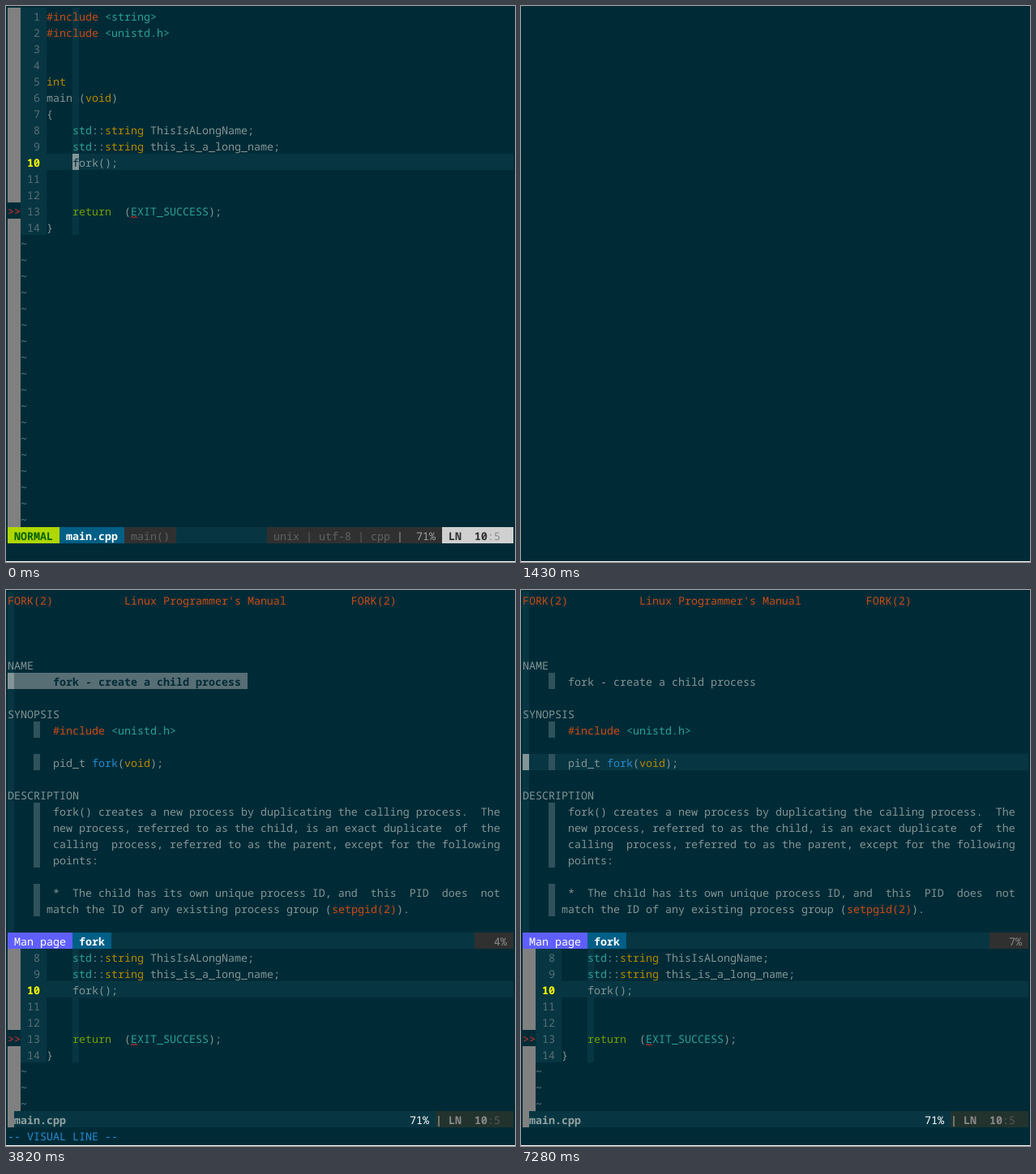
Animation of 628x685 px, one loop 8 s. Source, as an HTML page:

```html
<!DOCTYPE html>
<html lang="en">
<head>
<meta charset="utf-8">
<title>Editor session</title>
<style>
  html, body { margin: 0; width: 100%; height: 100%; overflow: hidden; background: #002b36; }
  svg { display: block; }
  text { font: 13.3333px "Noto Sans Mono", "DejaVu Sans Mono", monospace; white-space: pre; text-rendering: geometricPrecision; }
  .bold { font-weight: bold; }
</style>
</head>
<body>
<svg id="screen" width="628" height="685"></svg>
<script>
const LOOP = 8000, COLS = 78;
const BG = '#002b36', LINE = '#073642', GREY = '#808080', CURSOR = '#839496', DARK = '#303030';

// Each run of text starts with one of these keys; runs are split by tabs.
const INK = {
  t: '#839496', o: '#cb4b16', c: '#2aa198', y: '#b58900', g: '#719e07', b: '#268bd2',
  r: '#dc322f', n: '#586e75', z: '#657b83', d: BG, w: '#ffffff', q: '#626262', l: '#9e9e9e'
};

const SOURCE = [
  'o#include \tc<string>', 'o#include \tc<unistd.h>', '', '',
  'yint', 'tmain (\tyvoid\tt)', 't{',
  't    \tcstd\tt::\tystring\tt ThisIsALongName;',
  't    \tcstd\tt::\tystring\tt this_is_a_long_name;',
  't    fork();', '', '',
  't    \tgreturn\tt  (\tcEXIT_SUCCESS\tt);', 't}'
];

// row: [column, runs]
const MANUAL = {
  0: [0, "oFORK(2)           Linux Programmer's Manual          FORK(2)"],
  4: [0, 'tNAME'],
  5: [7, 'tfork - create a child process'],
  7: [0, 'tSYNOPSIS'],
  8: [7, 'o#include \tc<unistd.h>'],
  10: [7, 'tpid_t \tbfork\tt(\tyvoid\tt);'],
  12: [0, 'tDESCRIPTION'],
  13: [7, 'tfork() creates a new process by duplicating the calling process.  The'],
  14: [7, 'tnew process, referred to as the child, is an exact duplicate  of  the'],
  15: [7, 'tcalling  process, referred to as the parent, except for the following'],
  16: [7, 'tpoints:'],
  18: [7, 't*  The child has its own unique process ID, and  this  PID  does  not'],
  19: [6, 'tmatch the ID of any existing process group (\tosetpgid(2)\tt).']
};
const MANUAL_LINES = 145;

const MESSAGES = [
  'Error detected while processing function <SNR>25_AutoUpdate..<SNR>25_StartExpl',
  'orer:', 'line   83:',
  'E33: No previous substitute regular expression',
  'E33: No previous substitute regular expression',
  'Press ENTER or type command to continue'
];
const SCROLLS = [500, 570, 640, 700, 800];

// [cursor leaves its row, cursor arrives one row below]
const MOVES = [
  [2450, 2450], [2700, 2700], [2890, 2890], [3100, 3140], [3290, 3340],
  [6290, 6340], [6560, 6610], [6790, 6830], [7010, 7060], [7230, 7280]
];

const screen = document.getElementById('screen');
let out = '';

const px = col => 2 + col * 8;
const py = row => 2 + row * 20;
const escape = s => s.replace(/&/g, '&amp;').replace(/</g, '&lt;');
const plain = runs => runs.split('\t').map(run => run.slice(1)).join('');

function rect(x, y, w, h, fill) {
  out += `<rect x="${x}" y="${y}" width="${w}" height="${h}" fill="${fill}"/>`;
}

function box(col, row, cols, fill, rows = 1) {
  rect(px(col), py(row), cols * 8, rows * 20, fill);
}

function put(col, row, text, fill, bold) {
  out += `<text x="${px(col)}" y="${py(row) + 16}" fill="${fill}"${bold ? ' class="bold"' : ''}>${escape(text)}</text>`;
}

function write(col, row, runs) {
  for (const run of runs.split('\t')) {
    if (!run) continue;
    put(col, row, run.slice(1), INK[run[0]]);
    col += run.length - 1;
  }
}

function cursor(col, row, char = '') {
  box(col, row, 1, CURSOR);
  put(col, row, char, BG);
}

function editor(top, end, first) {
  box(0, top, 2, GREY, end - top);
  let row = top;
  for (let n = first; n <= SOURCE.length; n++, row++) {
    const current = n === 10;
    box(2, row, 4, LINE);
    box(10, row, 1, LINE);
    if (current) box(6, row, COLS - 6, LINE);
    put(2, row, String(n).padStart(3), current ? '#ffff00' : INK.n, current);
    write(6, row, SOURCE[n - 1]);
    if (n === 13) {
      box(0, row, 2, BG);
      write(0, row, 'r>>');
      out += `<path d="M${px(19)} ${py(row) + 19}l2-2 2 2 2-2 2 2" fill="none" stroke="${INK.r}"/>`;
    }
  }
  for (; row < end; row++) write(2, row, 'z~');
}

function activeStatus(row) {
  box(0, row, COLS, LINE);
  box(0, row, 8, '#afd700');
  put(1, row, 'NORMAL', '#005f00', true);
  box(8, row, 10, '#005f87');
  put(9, row, 'main.cpp', INK.w, true);
  box(18, row, 8, DARK);
  write(19, row, 'qmain()');
  box(40, row, 27, DARK);
  write(41, row, 'qunix | utf-8 | cpp \tl|  71%');
  box(67, row, 11, '#d0d0d0');
  put(68, row, 'LN  10', DARK, true);
  put(74, row, ':5', '#8a8a8a');
}

function idleStatus() {
  box(0, 32, COLS, LINE);
  box(0, 32, 1, GREY);
  put(1, 32, 'main.cpp', '#93a1a1', true);
  write(62, 32, 'w71%');
  box(66, 32, 12, '#22332e');
  put(66, 32, '|', '#bcbcbc');
  put(68, 32, 'LN  10', '#8a8a8a', true);
  put(74, 32, ':5', '#585858');
}

function messages(scroll) {
  for (let i = 0; i <= scroll; i++) {
    const text = MESSAGES[i], row = 33 - scroll + i;
    if (i === 5) {
      put(0, row, text, INK.c, true);
    } else {
      const note = i === 2;
      box(0, row, text.length, note ? LINE : '#d32f2a');
      put(0, row, text, note ? INK.n : BG);
    }
  }
  if (scroll === 5) cursor(MESSAGES[5].length, 33);
  else cursor(0, 33, MESSAGES[scroll][0]);
}

function manual(at, leaving, visual) {
  box(0, 0, 1, LINE, 21);
  const [col, runs] = MANUAL[at] || [0, ''];
  const end = col + plain(runs).length;
  if (!visual) {
    const from = leaving ? end : 0;
    box(from, at, COLS - from, LINE);
  }
  for (const [key, [start, text]] of Object.entries(MANUAL)) {
    const row = +key;
    if (start) box(4, row, 1, '#2f525c');
    if (visual && row === at) {
      box(0, row, end + 1, INK.n);
      put(start, row, plain(text), BG, true);
    } else {
      write(start, row, text);
    }
  }
  if (leaving) rect(px(0), py(at) + 19, 8, 1, CURSOR);
  else cursor(0, at, at ? '' : 'F');

  box(0, 21, COLS, LINE);
  box(0, 21, 10, '#5f5fff');
  write(1, 21, 'wMan page');
  box(10, 21, 6, '#005f87');
  put(11, 21, 'fork', INK.w, true);
  box(72, 21, 6, DARK);
  put(75, 21, Math.floor((at + 1) * 100 / MANUAL_LINES) + '%', '#8a8a8a');
}

function draw(t) {
  out = '';
  rect(0, 0, 628, 685, BG);
  if (t < 1430) {
    const scroll = SCROLLS.filter(time => time <= t).length;
    editor(0, 32 - scroll, 1 + scroll);
    activeStatus(32 - scroll);
    if (scroll) messages(scroll);
    else cursor(10, 9, 'f');
  } else if (t >= 1470) {
    const at = MOVES.filter(([, land]) => land <= t).length;
    const leaving = MOVES.some(([lift, land]) => lift <= t && t < land);
    manual(at, leaving, t >= 3820 && t < 5050);
    editor(22, 32, 8);
    idleStatus();
    if (t >= 3770 && t < 5050) write(0, 33, 'b-- VISUAL LINE --');
  }
  rect(0, 684, 628, 1, '#ffffff');
  return out;
}

let shown = '';
function tick() {
  const next = draw(performance.now() % LOOP);
  if (next !== shown) screen.innerHTML = shown = next;
  requestAnimationFrame(tick);
}
tick();
</script>
</body>
</html>
```
